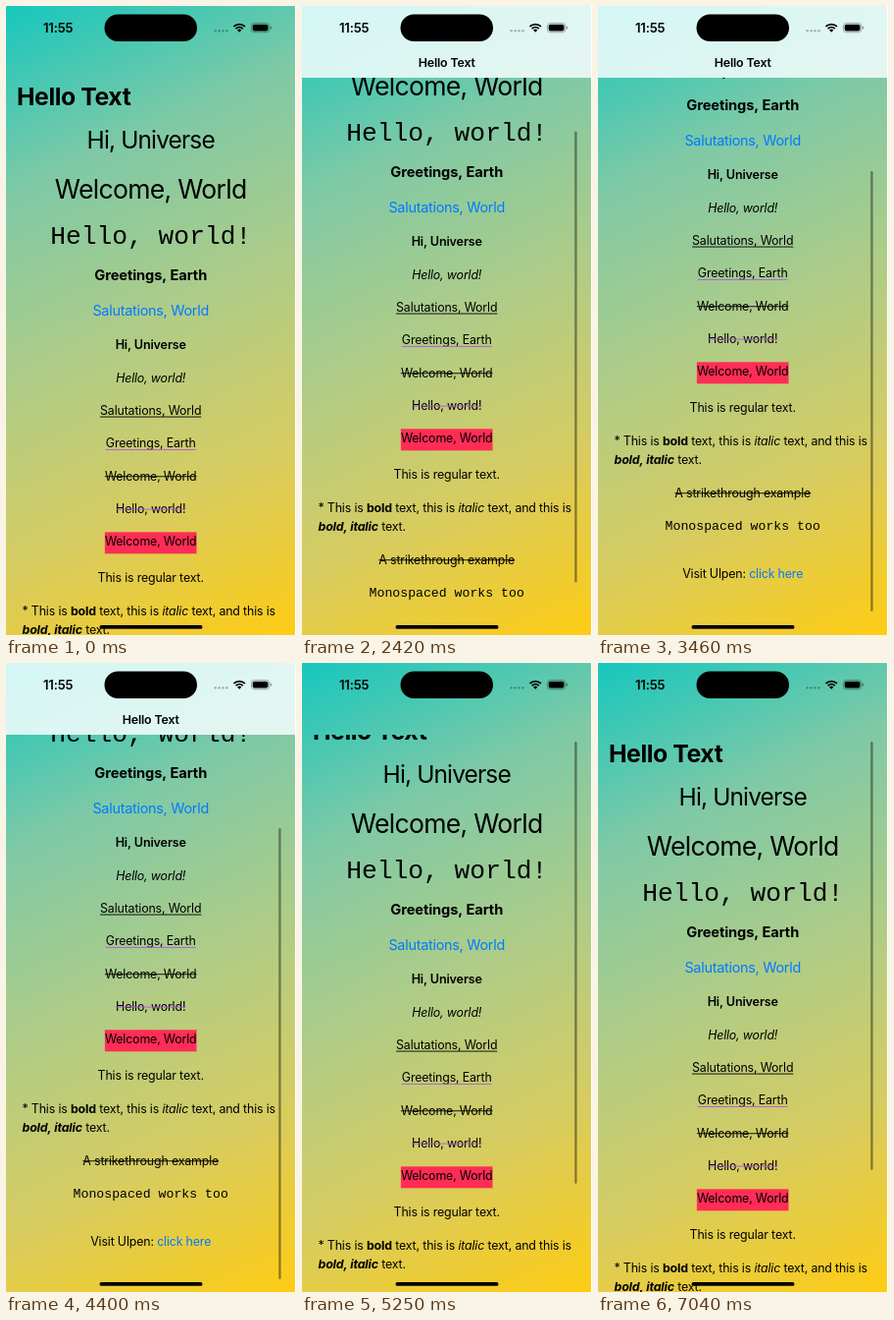
Animation of 296x640 px, one loop 7140 ms. Source, as an HTML page with a canvas:

```html
<!DOCTYPE html>
<html lang="en">
<head>
<meta charset="utf-8">
<title>Hello Text</title>
<style>
  html, body { margin: 0; width: 100%; height: 100%; overflow: hidden; background: #fff; }
  canvas { display: block; width: 295px; height: 640px; }
</style>
</head>
<body>
<canvas id="stage"></canvas>
<script>
const W = 295, H = 640, LOOP = 7140, CENTER = 147.7;
const NAV_BOTTOM = 73, MAX_SCROLL = 162, COLLAPSE = 38;
const SANS = 'Inter, sans-serif', MONO = '"Liberation Mono", monospace';
const BLUE = '#007aff', PURPLE = '#af52de', PINK = '#ff2d55';

const canvas = document.getElementById('stage');
const ctx = canvas.getContext('2d');
const ratio = window.devicePixelRatio || 1;
canvas.width = W * ratio;
canvas.height = H * ratio;

const clamp = (v, lo, hi) => Math.min(hi, Math.max(lo, v));

// [time in ms, scroll offset]; every pose is held until the next one
const poses = [
  [0, 0], [2080, 10], [2200, 35], [2310, 70], [2420, 105], [2530, 138],
  [2640, 169], [2760, 203], [2870, 219], [2990, 213],
  [3130, 196], [3240, 183], [3360, 173], [3470, 167], [3590, 163], [3730, 162],
  [4510, 158], [4610, 148], [4710, 130], [4820, 109], [4920, 87], [5020, 66],
  [5130, 44], [5240, 23], [5350, 6], [5460, -6], [5570, -10], [5680, -7],
  [5780, -3], [5890, -1], [6040, 0]
];
const scrollAt = t => poses.findLast(p => p[0] <= t)[1];

function setFont({ size = 12.4, weight = 400, italic = false, mono = false, track = -0.013 }) {
  ctx.font = `${italic ? 'italic ' : ''}${weight} ${size}px ${mono ? MONO : SANS}`;
  ctx.letterSpacing = `${mono ? 0 : size * track}px`;
}

function drawText(text, x, y, style = {}) {
  setFont(style);
  ctx.fillStyle = style.color || '#000';
  ctx.fillText(text, x, y);
}

function drawRuns(runs, y, left) {
  const widths = runs.map(([text, style = {}]) => {
    setFont(style);
    return ctx.measureText(text).width;
  });
  let x = left ?? CENTER - widths.reduce((a, b) => a + b, 0) / 2;
  runs.forEach(([text, style], i) => {
    drawText(text, x, y, style);
    x += widths[i];
  });
}

function drawLine(text, y, style = {}) {
  setFont(style);
  const width = ctx.measureText(text).width, x = CENTER - width / 2;
  if (style.fill) {
    ctx.fillStyle = style.fill;
    ctx.fillRect(x, y - 14, width, 22);
  }
  drawText(text, x, y, style);
  const rule = (color, dy) => {
    ctx.fillStyle = color;
    ctx.fillRect(x, y + dy, width, 0.9);
  };
  if (style.under) rule(style.under, 1.6);
  if (style.strike) rule(style.strike, -4.4);
}

const lines = [
  ['Hi, Universe', 145, { size: 24.5, track: -0.036 }],
  ['Welcome, World', 196, { size: 26.6, track: -0.027 }],
  ['Hello, world!', 241.7, { size: 26.3, mono: true }],
  ['Greetings, Earth', 279, { size: 14.7, weight: 700, track: -0.008 }],
  ['Salutations, World', 315, { size: 14.4, color: BLUE, track: -0.018 }],
  ['Hi, Universe', 349.3, { size: 12.6, weight: 600 }],
  ['Hello, world!', 382.5, { italic: true }],
  ['Salutations, World', 416, { under: '#000' }],
  ['Greetings, Earth', 449.3, { under: PURPLE }],
  ['Welcome, World', 482.7, { strike: '#000' }],
  ['Hello, world!', 516, { strike: PURPLE }],
  ['Welcome, World', 549.3, { fill: PINK }],
  ['This is regular text.', 586.3],
  ['A strikethrough example', 672.7, { strike: '#000' }],
  ['Monospaced works too', 706, { size: 13.2, mono: true }]
];

function drawContent(scroll) {
  ctx.save();
  if (scroll > 0) {
    ctx.beginPath();
    ctx.rect(0, NAV_BOTTOM, W, H);
    ctx.clip();
  }
  ctx.translate(0, -scroll);
  const stretch = 1 + Math.max(0, -scroll) * 0.0012;
  drawText('Hello Text', 11, 101, { size: 24.8 * stretch, weight: 700, track: -0.017 });
  lines.forEach(line => drawLine(...line));
  drawRuns([
    ['* This is '], ['bold', { weight: 700 }], [' text, this is '],
    ['italic', { italic: true }], [' text, and this is']
  ], 619.5, 16.5);
  drawRuns([['bold, italic', { weight: 700, italic: true }], [' text.']], 639, 16.5);
  drawRuns([['Visit Ulpen: '], ['click here', { color: BLUE }]], 754.5);
  ctx.restore();
}

// Mint to yellow, mixed perceptually
function drawBackground() {
  const g = ctx.createLinearGradient(0, 0, W, H);
  ['rgb(22,199,190)', 'rgb(127,201,166)', 'rgb(174,204,136)', 'rgb(215,204,96)', 'rgb(254,204,20)']
    .forEach((color, i) => g.addColorStop(i / 4, color));
  ctx.fillStyle = g;
  ctx.fillRect(0, 0, W, H);
}

function drawNavBar(scroll) {
  ctx.globalAlpha = clamp((scroll - 30) / 14, 0, 1);
  ctx.fillStyle = 'rgba(248,255,255,0.84)';
  ctx.fillRect(0, 0, W, NAV_BOTTOM);
  drawLine('Hello Text', 61.5, { weight: 600 });
  ctx.globalAlpha = 1;
}

function pill(x, y, w, h, r, color) {
  ctx.fillStyle = color;
  ctx.beginPath();
  ctx.roundRect(x, y, w, h, r);
  ctx.fill();
}

function drawScrollBar(scroll) {
  const inside = clamp(scroll, 0, MAX_SCROLL);
  const top = 80 + Math.max(0, inside - COLLAPSE) * 0.71;
  const length = 436 + Math.min(inside, COLLAPSE) * 23 / COLLAPSE - Math.abs(scroll - inside);
  pill(278.3, top, 2.3, length, 1.15, 'rgba(0,0,0,0.42)');
}

function drawWifi(x, y) {
  const from = -Math.PI * 0.75, to = -Math.PI * 0.25;
  ctx.strokeStyle = ctx.fillStyle = '#000';
  ctx.lineWidth = 1.8;
  for (const r of [5, 8.1]) {
    ctx.beginPath();
    ctx.arc(x, y, r, from, to);
    ctx.stroke();
  }
  ctx.beginPath();
  ctx.moveTo(x, y);
  ctx.arc(x, y, 3, from, to);
  ctx.fill();
}

function drawChrome() {
  drawText('11:55', 38, 26.5, { size: 13.1, weight: 600 });
  pill(100.5, 8.5, 94.5, 27.5, 13.75, '#000');
  for (let i = 0; i < 4; i++) pill(212.5 + i * 3.9, 24, 2.5, 2.5, 1.25, 'rgba(0,0,0,0.28)');
  drawWifi(238.2, 26.7);
  ctx.strokeStyle = 'rgba(0,0,0,0.4)';
  ctx.lineWidth = 0.8;
  ctx.beginPath();
  ctx.roundRect(250.4, 17.4, 18.4, 9.4, 3);
  ctx.stroke();
  pill(251.7, 18.7, 15.8, 6.8, 1.9, '#000');
  pill(269.8, 20.6, 1.1, 3, 0.6, 'rgba(0,0,0,0.45)');
  pill(95.5, 630, 105, 3.8, 1.9, '#000');
}

function render() {
  const t = performance.now() % LOOP, scroll = scrollAt(t);
  ctx.setTransform(ratio, 0, 0, ratio, 0, 0);
  drawBackground();
  drawContent(scroll);
  drawNavBar(scroll);
  if (t >= 1960) drawScrollBar(scroll);
  drawChrome();
  requestAnimationFrame(render);
}
render();
</script>
</body>
</html>
```
